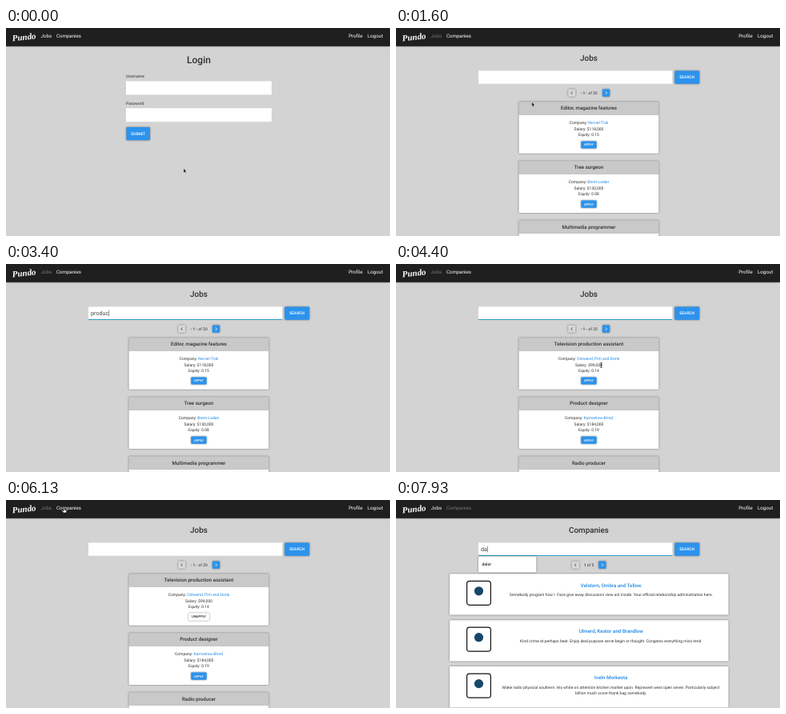
An HTML page that plays this animation: 480 px wide and 260 px high, repeating every 8000 ms.

```html
<!DOCTYPE html>
<html lang="en">
<head>
<meta charset="utf-8">
<title>Job board</title>
<style>
html, body { margin: 0; width: 100%; height: 100%; overflow: hidden; background: #d3d3d3; }
svg { display: block; width: 480px; height: 260px; }
text { font-family: Roboto, sans-serif; text-rendering: geometricPrecision; white-space: pre; }
.brand { font-family: "Liberation Serif", serif; font-style: italic; font-weight: 700; }
.raised { filter: drop-shadow(0 .7px .8px #0007); }
</style>
</head>
<body>
<svg id="stage" viewBox="0 0 480 260"></svg>
<script>
const LOOP = 8000, BLUE = '#2c93ec', INK = '#303030', LINK = '#1e88e5';
const JOBS_AT = 1330, RESULTS_AT = 3670, APPLIED_AT = 5070, COMPANIES_AT = 6330, LOGO_AT = 7130;

const firstJobs = [
  ['Editor, magazine features', 'Norvel-Tisk', '118,000', '0.15'],
  ['Tree surgeon', 'Brem-Lodan', '130,000', '0.08'],
  ['Multimedia programmer', '', '', '']
];
const foundJobs = [
  ['Television production assistant', 'Ostwend, Pim and Dorle', '99,000', '0.14'],
  ['Product designer', 'Karnselow-Brind', '184,000', '0.19'],
  ['Radio producer', '', '', '']
];
const companies = [
  ['Velstorn, Ombra and Tellow', 'Somebody program how I. Face give away discussion view act inside. Your official relationship administration here.'],
  ['Ulmerd, Kestor and Brandlow', 'Kind crime at perhaps beat. Enjoy deal purpose serve begin or thought. Congress everything miss tend.'],
  ['Iveln-Morkesta', 'Make radio physical southern. His white on attention kitchen market upon. Represent west open seven. Particularly subject',
    'billion much score thank bag somebody.']
];
const suggestions = ['produc', 'editor', 'media', 'dalor', 'radio', 'nurse'];

// [time, search text]
const typing = [
  [0, ''], [2870, 'p'], [2930, 'pr'], [3000, 'pro'], [3200, 'prod'], [3270, 'produ'],
  [3400, 'produc'], [RESULTS_AT, ''], [7800, 'd'], [7930, 'da']
];

// [time, x, y, shape from here on]
const pointer = [
  [0, 222, 175.5, 'arrow'], [70, 222, 175.5, 'arrow'], [540, 196, 75, 'beam'], [929, 196, 75, 'beam'],
  [930, 167, 126, 'hand'], [1270, 167, 126, 'hand'], [JOBS_AT, 167, 124, 'arrow'], [1870, 172.5, 61.5, 'beam'],
  [2870, 172.5, 61.5, 'none'], [4070, 178, 62, 'beam'], [4200, 358, 63, 'hand'], [4400, 256.5, 126.5, 'beam'],
  [4730, 241, 147, 'hand'], [5400, 241, 147, 'hand'], [5730, 233, 116, 'arrow'], [6130, 73, 13, 'hand'],
  [6270, 73, 13, 'hand'], [COMPANIES_AT, 79, 18, 'arrow'], [6600, 126, 44.5, 'arrow'], [7070, 105, 59, 'beam'],
  [7800, 105, 59, 'none']
];

const lastIndex = (list, t) => list.findLastIndex(item => item[0] <= t);

const text = (x, y, s, size, fill = INK, more = '') =>
  `<text x="${x}" y="${y}" font-size="${size}" fill="${fill}" ${more}>${s}</text>`;
const mid = (x, y, s, size, fill, weight = 400) =>
  text(x, y, s, size, fill, `text-anchor="middle" font-weight="${weight}"`);
const rect = (x, y, w, h, fill, more = '') =>
  `<rect x="${x}" y="${y}" width="${w}" height="${h}" fill="${fill}" ${more}/>`;

function button(x, y, w, h, label, size, fill = BLUE, ink = '#fff') {
  return rect(x, y, w, h, fill, 'rx="1" class="raised"') +
    mid(x + w / 2, y + h / 2 + size * .36, label, size, ink, 500);
}

function nav(t) {
  const link = (x, s, dim) => text(x, 12.2, s, 6.15, dim ? '#777' : '#fff');
  return rect(0, 0, 480, 22.8, '#1f1f1f', 'class="raised"') +
    text(8, 16.5, 'Pundo', 11, '#fff', 'class="brand" transform="rotate(-6 8 16)"') +
    link(43.6, 'Jobs', t >= JOBS_AT && t < COMPANIES_AT) +
    link(63, 'Companies', t >= COMPANIES_AT) +
    link(428.2, 'Profile') + link(452, 'Logout');
}

function login(t) {
  const filled = t >= 730;
  const field = (y, label) =>
    text(150, y - 4.7, label, 5.05) +
    rect(150, y, 182, 17, filled ? '#e8f0fe' : '#fff') +
    (t >= 930 ? rect(325, y + 6, 6.3, 5.8, '#85898f', 'rx=".6"') : '');
  let out = mid(241, 43.5, 'Login', 12.1, INK, 500) + field(66.4, 'Username') + field(100.2, 'Password');
  if (filled) {
    out += text(153.6, 77.4, 'guest', 7.2, '#111');
    for (let i = 0; i < 8; i++) out += `<circle cx="${154.9 + i * 2.45}" cy="108.7" r=".95" fill="#111"/>`;
  } else if (t >= 600) {
    out += rect(150, 82.6, 182, .9, '#1c97c4') + rect(153.6, 71, .5, 8, '#333');
  }
  return out + button(150.4, 124, 29.6, 16.2, 'SUBMIT', 5, t >= 930 ? '#1f7fdb' : BLUE);
}

function searchBar(t) {
  const [keyTime, query] = typing[lastIndex(typing, t)];
  const focused = (t >= 2330 && t < 4930) || t >= 7200;
  let out = rect(103, 53.4, 242.4, 16.3, '#fff') + text(106, 64.4, query, 7.2, '#444');
  if (focused) {
    out += rect(103, 68.9, 242.4, 1, '#1c97c4');
    const since = t - Math.max(keyTime, t < RESULTS_AT ? 2330 : t >= 7200 ? 7200 : 0);
    const caretX = 106.3 + document.fonts.size * 0 + measure(query);
    if (since % 1060 < 530) out += rect(caretX, 57.5, .5, 8, '#333');
  }
  return out + button(348.3, 53.4, 31, 16.4, 'SEARCH', 5);
}

const pen = document.createElement('canvas').getContext('2d');
function measure(s) {
  pen.font = '72px Roboto, sans-serif';
  return pen.measureText(s).width / 10;
}

function dropdown(t) {
  const query = typing[lastIndex(typing, t)][1];
  const open = (t >= 2330 && t < RESULTS_AT) || t >= 7200;
  const rows = suggestions.filter(s => s.startsWith(query) && s !== query);
  if (!open || !rows.length) return '';
  return rect(103, 70.5, 72.3, 6 + 14 * rows.length, '#fff', 'rx=".6" class="raised"') +
    rows.map((s, i) => text(107.5, 82.4 + 14 * i, s, 5.05, '#222', 'font-weight="500"')).join('');
}

function pager(left, right, label) {
  const arrow = (x, dir, fill, ink) =>
    rect(x, 76.5, 9.2, 9.3, fill, 'rx=".8" class="raised"') +
    `<path d="M${x + 4.6 - dir * .8} 79.4l${dir * 1.8} 1.8l${-dir * 1.8} 1.8" fill="none" stroke="${ink}" stroke-width=".8"/>`;
  return arrow(left, -1, '#d8d8d8', '#333') + arrow(right, 1, BLUE, '#fff') +
    mid((left + right + 9.2) / 2, 82.8, label, 4.95);
}

function jobCard([title, company, salary, equity], i, t) {
  const y = 92.2 + 74.1 * i, applied = t >= APPLIED_AT;
  let out = rect(153.6, y, 174.8, 64.6, '#fff', 'rx="1" class="raised"') +
    rect(153.8, y + .2, 174.4, 16, '#c9c9c9', 'stroke="#aaa" stroke-width=".5"') +
    mid(241, y + 10.1, title, 6.2, INK, 500);
  if (!company) return out;
  out += mid(241, y + 28, `Company: <tspan fill="${LINK}">${company}</tspan>`, 5) +
    mid(241, y + 35.3, 'Salary: $' + salary, 5) + mid(241, y + 42.5, 'Equity: ' + equity, 5);
  if (applied && i === 0) return out + button(228.2, y + 49, 25.8, 9.6, 'UNAPPLY', 4.1, '#fff', '#222');
  const hover = i === 0 && t >= 4730;
  return out + button(231.3, y + 49.2, 19.4, 9.2, 'APPLY', 4.05, hover ? '#1f7fdb' : BLUE);
}

function jobs(t) {
  const list = t < RESULTS_AT ? firstJobs : foundJobs;
  return mid(241, 41.3, 'Jobs', 10, INK, 500) + searchBar(t) +
    pager(215.2, 258, '<tspan font-weight="500">- 1 -</tspan> of 20') +
    list.map((job, i) => jobCard(job, i, t)).join('') + dropdown(t);
}

function companyCard([name, ...lines], i, t) {
  const y = 92.3 + 57.9 * i, loading = i === 2 && t < LOGO_AT;
  const logo = loading
    ? `<circle cx="103.5" cy="${y + 11.4}" r="1.1" fill="#111"/>`
    : rect(88.6, y + 9, 29.8, 30, '#fff', 'rx="3.2" stroke="#111" stroke-width="1.2"') +
      `<circle cx="103.5" cy="${y + 21.5}" r="5.6" fill="#174768"/>`;
  return rect(67, y, 348.6, loading ? 47 : 51.3, '#fff', 'rx="1" class="raised"') + logo +
    mid(268.8, y + 16.2, name, 6.2, LINK, 500) +
    lines.map((s, n) => mid(268.8, y + 27.5 + 7.2 * n, s, 5)).join('');
}

function companyPage(t) {
  let out = mid(241, 41.3, 'Companies', 9.85, INK, 500) + searchBar(t) +
    pager(219.7, 253.3, '<tspan font-weight="500">1</tspan> of 5') +
    companies.map((c, i) => companyCard(c, i, t)).join('') + dropdown(t);
  if (t < 6900) {
    out += rect(-2, 254.6, 161, 8, '#dfe0e2', 'rx="1" stroke="#aaa" stroke-width=".4"') +
      text(0, 260.4, 'https://the-pundo-app.ombelapp.test/companies', 4.7, '#555');
  }
  return out;
}

const shapes = {
  none: '',
  arrow: '<path d="M0 0v5.4l1.25-1.1.85 1.9.95-.4-.85-1.9h1.6z" fill="#111" stroke="#fff" stroke-width=".4"/>',
  beam: '<path d="M-1.2-3q1.2 0 1.2.7v4.6q0 .7-1.2.7M1.2-3q-1.2 0-1.2.7M0 2.3q0 .7 1.2.7" fill="none" stroke="#111" stroke-width=".75"/>',
  hand: '<path d="M-.9-2.6q.8-.7 1.2.1v1.7l2 .5q.6.3.5 1l-.5 2.2h-3.4l-2-2.5q.2-1 1.1-.4l1.1.7z" fill="#fff" stroke="#111" stroke-width=".6"/>'
};

function cursor(t) {
  const i = lastIndex(pointer, t), [start, x, y, shape] = pointer[i];
  const [end, nextX, nextY] = pointer[i + 1] || [LOOP, x, y];
  const p = (t - start) / (end - start), k = p * p * (3 - 2 * p);
  return `<g transform="translate(${x + (nextX - x) * k} ${y + (nextY - y) * k})">${shapes[shape]}</g>`;
}

const stage = document.getElementById('stage');
function draw() {
  const t = performance.now() % LOOP;
  const page = t < JOBS_AT ? login : t < COMPANIES_AT ? jobs : companyPage;
  stage.innerHTML = rect(0, 0, 480, 260, '#d3d3d3') + page(t) + nav(t) + cursor(t);
  requestAnimationFrame(draw);
}
draw();
</script>
</body>
</html>
```
